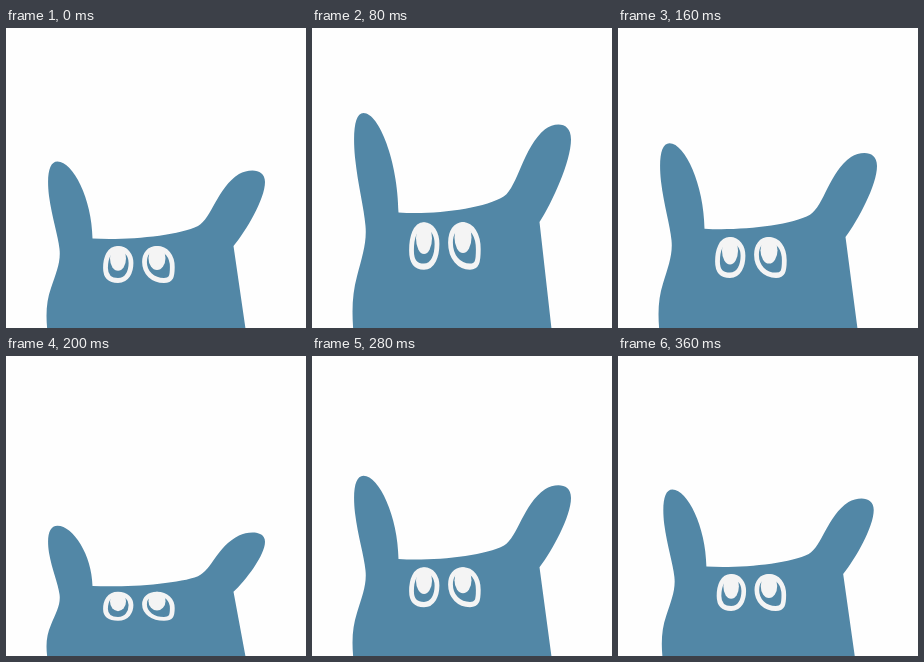
An HTML page that plays this animation: 300 by 300 pixels, repeating every 640 ms.

```html
<!DOCTYPE html>
<html lang="en">
<head>
<meta charset="utf-8">
<title>Bouncing critter</title>
<style>
  html, body { margin: 0; width: 100%; height: 100%; overflow: hidden; background: #fefefe; }
  svg { display: block; width: 100%; height: 100%; }
</style>
</head>
<body>
<svg viewBox="0 0 300 300">
  <g id="critter">
    <path fill="#5287a6" d="M41.5 304 C39.5 286 40.5 273 45 260 C50 245 55 234 53.5 221
      C52 207 46 190 43 168 C40.5 147 43 133.5 51.5 133.5 C67 133.5 86 171 86.5 210.5
      C120 212.5 172 208 192 198 C206 190 211 160 233 146 C243 140.5 259 140 259 154
      C259 171 240 203 227.5 218 L240 304 Z"/>
    <g fill="none" stroke="#f4f4f4" stroke-width="4.8">
      <path d="M112 220.5 C103 220.5 99.5 230 99.5 240 C99.5 249 104 252.5 112 252.5
        C121 252.5 125 244 125 235 C125 227 120 220.5 112 220.5 Z"/>
      <path d="M151 220.5 C143 220.5 138.5 226 138.5 234 C138.5 245 147 252.5 158 252.5
        C165 252.5 166.3 249 166.3 239 C166.3 228 160 220.5 151 220.5 Z"/>
    </g>
    <g fill="#f4f4f4">
      <ellipse cx="112" cy="230.5" rx="8" ry="12.2"/>
      <ellipse cx="151" cy="230" rx="8.5" ry="12"/>
    </g>
  </g>
</svg>
<script>
  const LOOP = 640, STEP = 40;
  const critter = document.getElementById('critter');
  // time, horizontal scale, vertical scale
  const keys = [
    [0, 1, 1],
    [120, 1, 1.437],
    [200, 1, 0.783],
    [280, 1, 1.083],
    [360, 0.97, 1],
    [LOOP, 0.97, 1]
  ];

  function scaleAt(t) {
    const i = keys.findIndex(k => k[0] > t);
    const a = keys[i - 1], b = keys[i];
    const p = (t - a[0]) / (b[0] - a[0]);
    return [1, 2].map(n => a[n] + (b[n] - a[n]) * p);
  }

  function draw(ms) {
    const t = Math.floor((ms % LOOP) / STEP) * STEP;
    const [sx, sy] = scaleAt(t);
    critter.setAttribute('transform',
      `translate(150 300) scale(${sx} ${sy}) translate(-150 -300)`);
  }

  const start = performance.now();
  function tick() {
    draw(performance.now() - start);
    requestAnimationFrame(tick);
  }
  tick();
</script>
</body>
</html>
```
